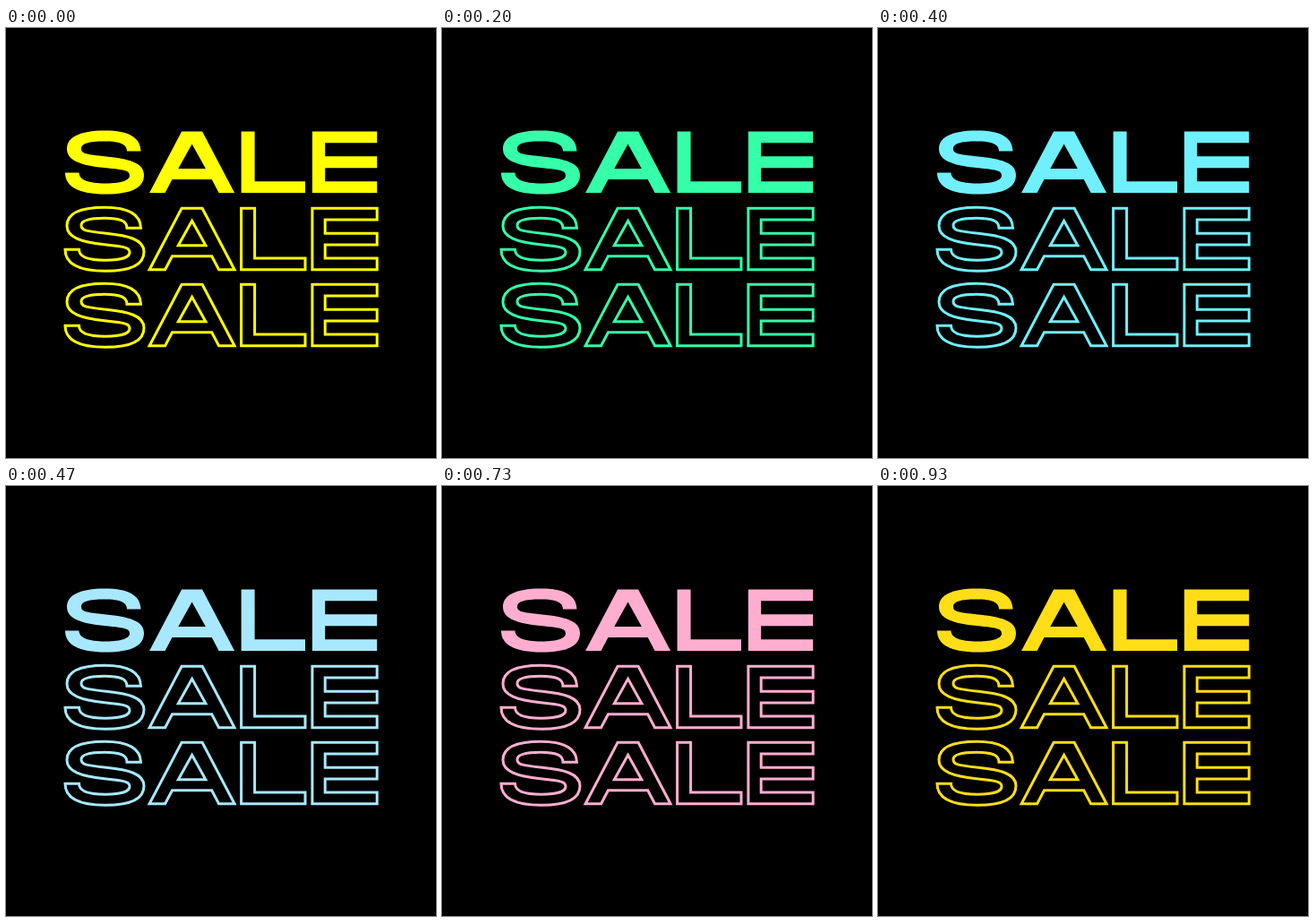
Animation, 480 px wide and 480 px high, one loop 990 ms. Source, as an HTML page:

```html
<!DOCTYPE html>
<html lang="en">
<head>
<meta charset="utf-8">
<title>Sale</title>
<style>
  html, body { margin: 0; width: 100%; height: 100%; overflow: hidden; background: #000; }
  svg { display: block; width: 100%; height: 100%; }
  .line { fill: none; stroke: currentColor; stroke-width: 3; stroke-miterlimit: 6; }
</style>
</head>
<body>
<svg id="stage" viewBox="0 0 480 480" role="img" aria-label="SALE SALE SALE">
  <defs><path id="word" fill-rule="evenodd"/></defs>
  <use href="#word" fill="currentColor"/>
  <use href="#word" class="line" y="85.8"/>
  <use href="#word" class="line" y="170.8"/>
</svg>
<script>
  const LOOP = 990, STEPS = 15;
  const TOP = 115.5, BASE = 184, BAR = 12.8;
  const stage = document.getElementById('stage');

  const letterS = () => `M150.5 137.5 C150 122.5 138 114.5 110 114.5
    S68 122 68 135 S84 153.5 110 156 S138 160 138 164.8
    S130 173.5 111 173.5 S81.5 169.5 81.5 161.5 H66
    C66 177 81 185.5 111 185.5 S154 178 154 164
    S136 146 112 143.5 S84 140 84 134.5
    S92 126.5 110 126.5 S135 130 135 137.5 Z`;

  // Symmetric about mid: outer legs, crossbar and triangular counter
  function letterA(mid) {
    const barTop = 157, barBase = 169, foot = 30, reach = 47.5, flat = 11.5;
    const inner = foot - (BASE - barBase) * (reach - flat) / (BASE - TOP);
    const half = [[flat, TOP], [reach, BASE], [foot, BASE], [inner, barBase]];
    const left = half.map(([x, y]) => [-x, y]).reverse();
    const points = [...half, ...left].map(([x, y]) => `${mid + x} ${y}`);
    return `M${points.join('L')}Z M${mid} 129.5 l15.3 ${barTop - 129.5} h-30.6 Z`;
  }

  const letterL = (x, right) =>
    `M${x} ${TOP} h15 V${BASE - BAR} H${right} V${BASE} H${x} Z`;

  function letterE(x, right) {
    const gap = (BASE - TOP - 3 * BAR) / 2;
    const notch = `v${BAR} H${x + 14.3} v${gap} H${right}`;
    return `M${x} ${TOP} H${right} ${notch} ${notch} V${BASE} H${x} Z`;
  }

  document.getElementById('word').setAttribute('d',
    letterS() + letterA(207.6) + letterL(262.6, 334) + letterE(341.9, 414.2));

  // Step number: colour
  const keys = {
    0: 0xffff00, 1: 0xa0ff0a, 4: 0x00fff7, 7: 0xa8e8ff,
    9: 0xffaeff, 12: 0xffaeb8, 14: 0xffde18
  };
  const stops = Object.keys(keys).map(Number);
  const channels = c => [c >> 16, c >> 8 & 255, c & 255];

  function colourAt(step) {
    const to = stops.find(s => s >= step);
    const from = stops.findLast(s => s <= step);
    const p = (step - from) / (to - from || 1);
    const a = channels(keys[from]), b = channels(keys[to]);
    return `rgb(${a.map((v, i) => Math.round(v + (b[i] - v) * p))})`;
  }

  // Steps begin on whole hundredths of a second: 0, 70, 130, 200 ...
  const startOf = i => Math.round(i * 20 / 3) * 10;

  function draw(time) {
    const t = time % LOOP;
    let step = STEPS - 1;
    while (step > 0 && startOf(step) > t) step--;
    stage.style.color = colourAt(step);
  }

  const begin = performance.now();
  function tick() {
    draw(performance.now() - begin);
    requestAnimationFrame(tick);
  }
  tick();
</script>
</body>
</html>
```
